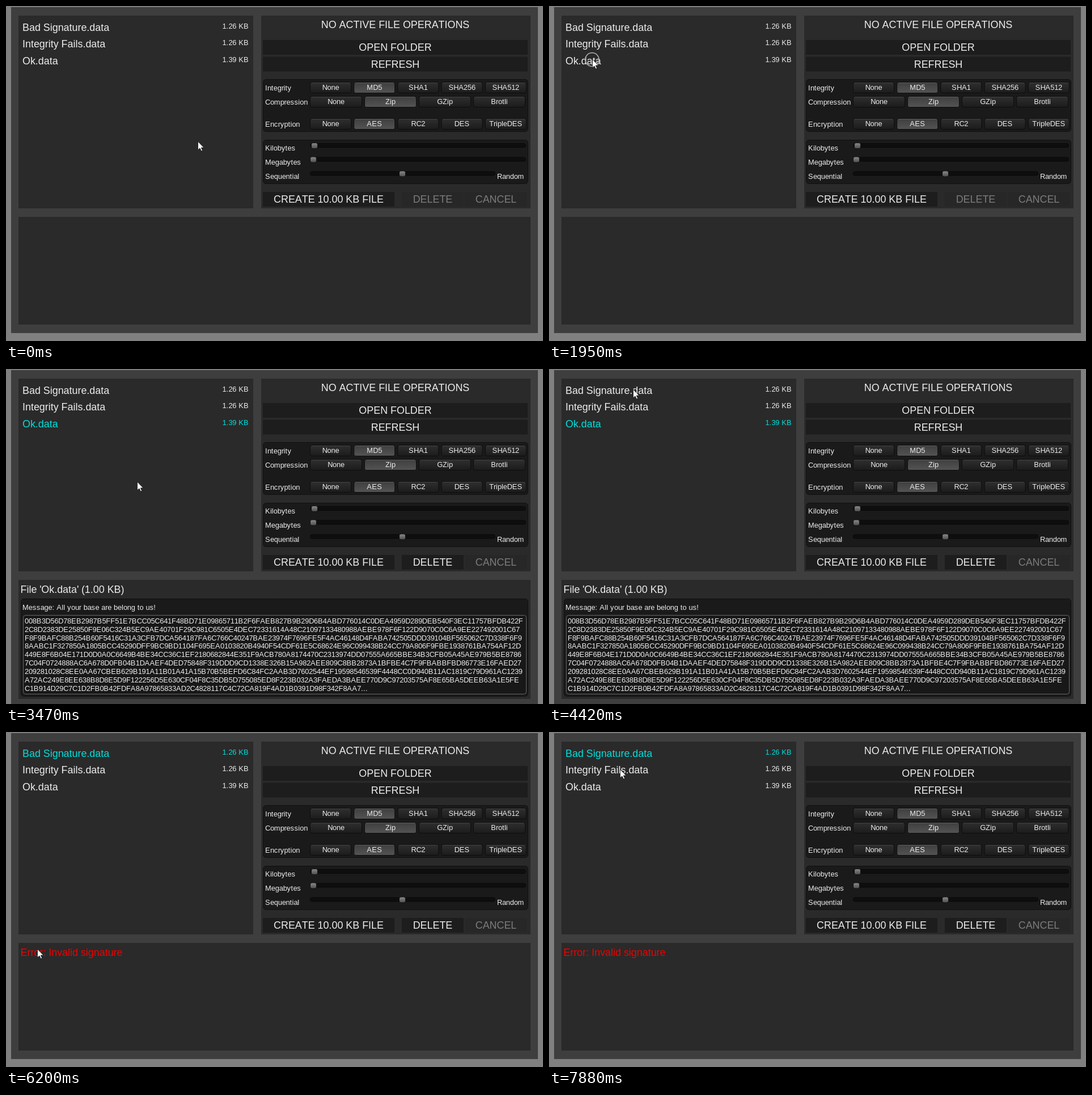
These frames come from a looping animation (947x591 px, 8 s). An HTML page with a canvas:

```html
<!DOCTYPE html>
<html lang="en">
<head>
<meta charset="utf-8">
<title>File operations</title>
<style>
  html, body { margin: 0; width: 100%; height: 100%; overflow: hidden; background: #808080; }
  canvas { display: block; }
</style>
</head>
<body>
<canvas id="stage" width="947" height="591"></canvas>
<script>
const ctx = document.getElementById('stage').getContext('2d');
const LOOP = 8000;
const LIGHT = '#ececec', CYAN = '#00e0dc', DIM = '#7c7c7c';
const BIG = 17.9, SMALL = 12.85;
const ARROW = new Path2D('M0 0V15L3.4 11.8L6 17L8.2 16L5.8 10.9H10.6Z');

const FILES = [
  ['Bad Signature.data', '1.26 KB'],
  ['Integrity Fails.data', '1.26 KB'],
  ['Ok.data', '1.39 KB'],
];
const CONTENT = [
  '008B3D56D78EB2987B5FF51E7BCC05C641F48BD71E09865711B2F6FAEB827B9B29D6B4ABD776014C0DEA4959D289DEB540F3EC11757BFDB422F',
  '2C8D2383DE25850F9E06C324B5EC9AE40701F29C981C6505E4DEC72331614A48C21097133480988AEBE978F6F122D9070C0C6A9EE227492001C67',
  'F8F9BAFC88B254B60F5416C31A3CFB7DCA564187FA6C766C40247BAE23974F7696FE5F4AC46148D4FABA742505DDD39104BF565062C7D338F6F9',
  '8AABC1F327850A1805BCC45290DFF9BC9BD1104F695EA0103820B4940F54CDF61E5C68624E96C099438B24CC79A806F9FBE1938761BA754AF12D',
  '449E8F6B04E171D0D0A0C6649B4BE34CC36C1EF2180682844E351F9ACB780A8174470C2313974DD07555A665BBE34B3CFB05A45AE979B5BE8786',
  '7C04F0724888AC6A678D0FB04B1DAAEF4DED75848F319DDD9CD1338E326B15A982AEE809C8BB2873A1BFBE4C7F9FBABBFBD86773E16FAED27',
  '209281028C8EE0AA67CBEB629B191A11B01A41A15B70B5BEFD6C84FC2AAB3D7602544EF19598546539F4448CC0D940B11AC1819C79D961AC1239',
  'A72AC249E8EE638B8D8E5D9F122256D5E630CF04F8C35DB5D755085ED8F223B032A3FAEDA3BAEE770D9C97203575AF8E65BA5DEEB63A1E5FE',
  'C1B914D29C7C1D2FB0B42FDFA8A97865833AD2C4828117C4C72CA819F4AD1B0391D98F342F8AA7...',
];

// Cursor keys: time, x, y
const PATH = [
  [0, 338, 239], [890, 338, 239], [1250, 210, 151], [1690, 76, 94],
  [2290, 76, 94], [3050, 238, 222], [3120, 238, 222], [3470, 231, 199],
  [3780, 201, 95], [3950, 212, 39], [4250, 158, 32], [4420, 148, 36],
  [5680, 148, 37], [6000, 125, 240], [6240, 50, 392], [6520, 232, 401],
  [6560, 233, 402], [6710, 66, 411], [6840, 151, 350], [7360, 197, 203],
  [7880, 125, 66], [8000, 125, 66],
];

const slope = (i, axis) => {
  if (i < 0 || i >= PATH.length - 1) return 0;
  return (PATH[i + 1][axis] - PATH[i][axis]) / (PATH[i + 1][0] - PATH[i][0]);
};
// Harmonic mean keeps each axis from overshooting its keys.
const tangent = (i, axis) => {
  const a = slope(i - 1, axis), b = slope(i, axis);
  return a * b > 0 ? 2 * a * b / (a + b) : 0;
};
function cursorAt(time) {
  let i = 0;
  while (i < PATH.length - 2 && PATH[i + 1][0] <= time) i++;
  const span = PATH[i + 1][0] - PATH[i][0], u = (time - PATH[i][0]) / span, v = 1 - u;
  return [1, 2].map(axis =>
    PATH[i][axis] * v * v * (1 + 2 * u) + PATH[i + 1][axis] * u * u * (3 - 2 * u) +
    span * u * v * (v * tangent(i, axis) - u * tangent(i + 1, axis)));
}

function rect(left, top, right, bottom, color) {
  ctx.fillStyle = color;
  ctx.fillRect(left, top, right - left, bottom - top);
}

function rounded(left, top, right, bottom, radius, fill, border) {
  ctx.beginPath();
  ctx.roundRect(left + .5, top + .5, right - left - 1, bottom - top - 1, radius);
  ctx.fillStyle = fill;
  ctx.fill();
  ctx.strokeStyle = border;
  ctx.lineWidth = 1;
  ctx.stroke();
}

const setFont = size => ctx.font = `${size}px "Liberation Sans", Arial, sans-serif`;

// Glyph advances are whole pixels at the nominal size, then scaled with the interface.
const advances = new Map();
function advance(char, size) {
  const key = char + size;
  if (!advances.has(key)) {
    const nominal = Math.round(size);
    setFont(100);
    const width = ctx.measureText(char).width * nominal / 100;
    advances.set(key, Math.round(width + .01) * size / nominal);
    setFont(size);
  }
  return advances.get(key);
}

// middle is the vertical centre of the capitals
function text(str, x, middle, size = SMALL, color = LIGHT, align = 0) {
  setFont(size);
  ctx.fillStyle = color;
  const chars = [...str];
  x -= align * chars.reduce((sum, char) => sum + advance(char, size), 0);
  for (const char of chars) {
    ctx.fillText(char, x, middle + size * .355);
    x += advance(char, size);
  }
}
const CENTER = .5, RIGHT = 1;

function shade(top, bottom, from, to) {
  const gradient = ctx.createLinearGradient(0, top, 0, bottom);
  gradient.addColorStop(0, from);
  gradient.addColorStop(1, to);
  return gradient;
}

function bar(label, left, top, right, enabled = true) {
  rect(left, top, right, top + 26, enabled ? '#1d1d1d' : '#272727');
  text(label, (left + right) / 2, top + 13, BIG, enabled ? LIGHT : DIM, CENTER);
}

function toggles(label, options, chosen, top, step, width) {
  text(label, 457, top + 10);
  options.forEach((option, i) => {
    const left = 536 + i * step;
    const fill = i === chosen ? shade(top, top + 20, '#3e3e3e', '#545454')
                              : shade(top, top + 20, '#303030', '#1b1b1b');
    rounded(left, top, left + width, top + 20, 3, fill, '#0d0d0d');
    rect(left + 3, top + 1, left + width - 3, top + 2, i === chosen ? '#606060' : '#444444');
    text(option, left + width / 2, top + 9.7, SMALL, LIGHT, CENTER);
  });
}

function slider(label, middle, right, thumb) {
  text(label, 457, middle + 4.7);
  rounded(536, middle - 4, right, middle + 4, 3, '#0e0e0e', '#080808');
  rounded(thumb - 6, middle - 5, thumb + 6, middle + 6, 3,
          shade(middle - 5, middle + 6, '#8c8c8c', '#4c4c4c'), '#101010');
}

function drawControls(canDelete) {
  rect(450, 17, 925, 357, '#2a2a2a');
  text('NO ACTIVE FILE OPERATIONS', 686.5, 33, BIG, LIGHT, CENTER);
  bar('OPEN FOLDER', 453, 60, 920);
  bar('REFRESH', 453, 89.5, 920);

  rounded(453, 129, 921, 222, 5, '#1a1a1a', '#101010');
  toggles('Integrity', ['None', 'MD5', 'SHA1', 'SHA256', 'SHA512'], 1, 134, 77.2, 73);
  toggles('Compression', ['None', 'Zip', 'GZip', 'Brotli'], 1, 159, 96, 92);
  toggles('Encryption', ['None', 'AES', 'RC2', 'DES', 'TripleDES'], 1, 198, 77.2, 73);

  rounded(453, 236, 921, 314, 5, '#1a1a1a', '#101010');
  slider('Kilobytes', 246, 917, 544);
  slider('Megabytes', 270.5, 917, 542);
  slider('Sequential', 295.5, 863, 699);
  text('Random', 866, 300.2);

  bar('CREATE 10.00 KB FILE', 453, 328, 685);
  bar('DELETE', 698, 328, 807, canDelete);
  bar('CANCEL', 809, 328, 919, false);
}

function drawFiles(selected) {
  rect(22, 17, 436, 357, '#2a2a2a');
  FILES.forEach(([name, size], i) => {
    const color = i === selected ? CYAN : LIGHT, middle = 37.3 + i * 29.7;
    text(name, 29, middle, BIG, color);
    text(size, 428, middle - 2.3, SMALL, color, RIGHT);
  });
}

function drawContent() {
  rect(22, 372, 925, 582, '#2a2a2a');
  text("File 'Ok.data' (1.00 KB)", 25.5, 388.5, BIG);
  rounded(26, 405, 921, 578, 5, '#1a1a1a', '#101010');
  text('Message: All your base are belong to us!', 29, 420.3);
  rounded(30, 434, 918, 574, 4, '#181818', '#686868');
  CONTENT.forEach((line, i) => text(line, 33, 444.3 + i * 14.85));
}

function drawCursor([x, y], pressed) {
  if (pressed) {
    ctx.beginPath();
    ctx.arc(x, y + .5, 12, 0, Math.PI * 2);
    ctx.strokeStyle = '#b4b4b4';
    ctx.lineWidth = 1.5;
    ctx.stroke();
  }
  ctx.save();
  ctx.translate(Math.round(x) + .5, Math.round(y));
  ctx.fillStyle = '#fff';
  ctx.strokeStyle = '#111';
  ctx.lineWidth = .8;
  ctx.fill(ARROW);
  ctx.stroke(ARROW);
  ctx.restore();
}

function draw(time) {
  const selected = time < 1960 ? -1 : time < 5350 ? 2 : 0;
  const loaded = time >= 2070 && time < 5350;
  const pressed = time >= 1840 && time < 1960 || time >= 5200 && time < 5350;

  rect(0, 0, 947, 591, '#808080');
  rect(9, 2, 938, loaded ? 591 : 577, '#3e3e3e');
  drawFiles(selected);
  drawControls(selected >= 0);
  if (loaded) {
    drawContent();
  } else {
    rect(22, 372, 925, 562, '#2a2a2a');
    if (time >= 5350) text('Error: Invalid signature', 25.5, 388.5, BIG, '#f00000');
  }
  drawCursor(cursorAt(time), pressed);
}

const start = performance.now();
function tick() {
  draw((performance.now() - start) % LOOP);
  requestAnimationFrame(tick);
}
tick();
</script>
</body>
</html>
```
